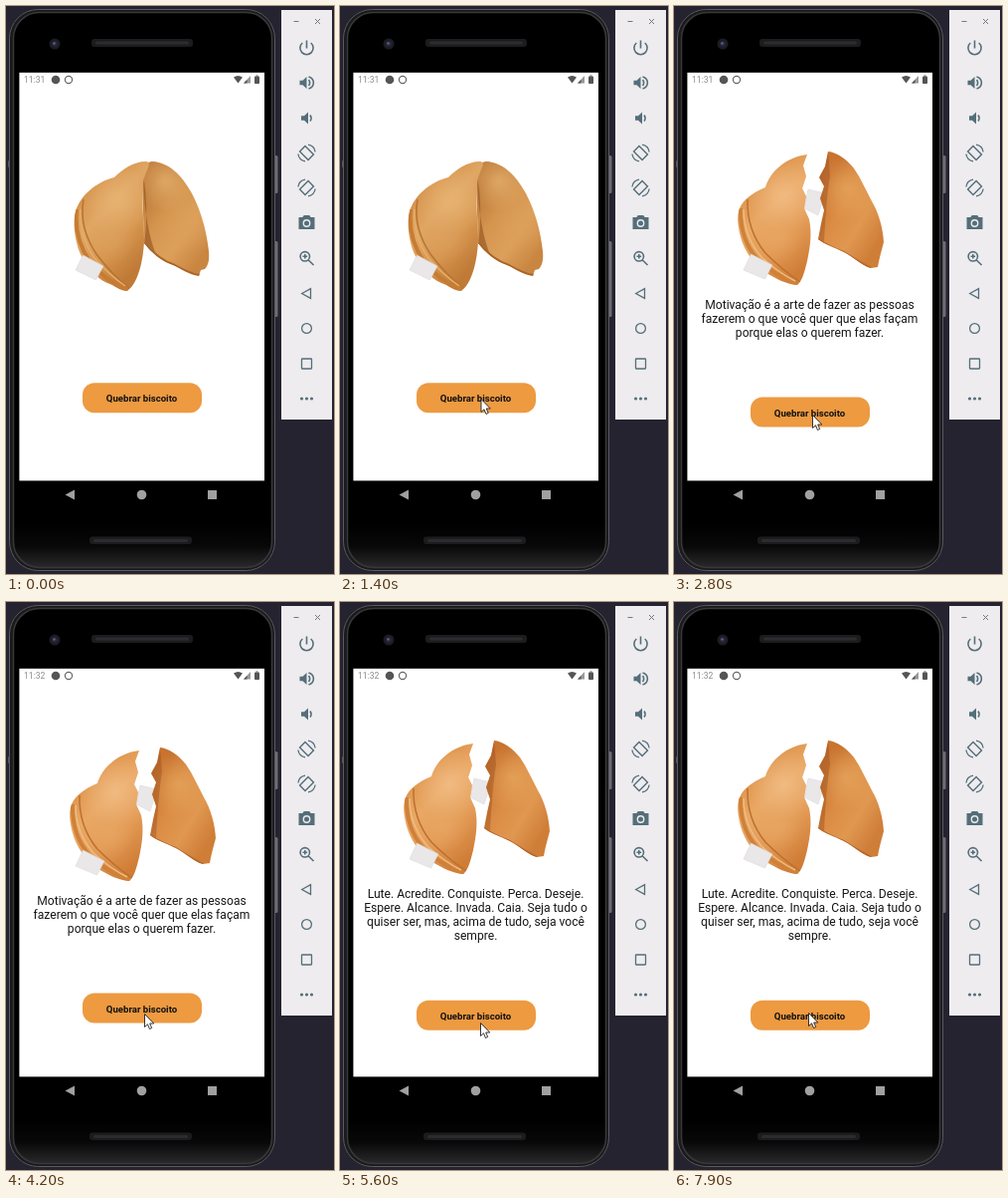
These frames come from a looping animation (330 by 570 pixels, 8000 ms). An HTML page with a canvas:

```html
<!DOCTYPE html>
<html lang="pt">
<head>
<meta charset="utf-8">
<style>
html, body { margin: 0; width: 330px; height: 570px; overflow: hidden; background: #262330; }
canvas { display: block; width: 330px; height: 570px; }
</style>
</head>
<body>
<canvas id="stage"></canvas>
<script>
const LOOP = 8000, CRACK = 1650, SECOND = 5000, MINUTE = 4000;
const canvas = document.getElementById('stage');
const ratio = window.devicePixelRatio || 1;
canvas.width = 330 * ratio;
canvas.height = 570 * ratio;
const c = canvas.getContext('2d');

const quotes = [
  ['Motivação é a arte de fazer as pessoas', 'fazerem o que você quer que elas façam', 'porque elas o querem fazer.'],
  ['Lute. Acredite. Conquiste. Perca. Deseje.', 'Espere. Alcance. Invada. Caia. Seja tudo o', 'quiser ser, mas, acima de tudo, seja você', 'sempre.']
];

// time, x, y of the pointer tip
const track = [
  [400, 122, 435], [800, 127, 418], [900, 134, 407], [1200, 141, 396], [1600, 142, 392],
  [1900, 142, 392], [2700, 139, 406], [2800, 139, 410], [3500, 139, 413], [5000, 139, 413],
  [5400, 141, 422], [6500, 141, 422], [7200, 136, 413], [7900, 135, 412]
];

function shape(path, fill, stroke, width = 1) {
  const p = new Path2D(path);
  if (fill) { c.fillStyle = fill; c.fill(p); }
  if (stroke) { c.strokeStyle = stroke; c.lineWidth = width; c.stroke(p); }
}
function box(x, y, w, h, r, fill, stroke, width = 1) {
  c.beginPath();
  c.roundRect(x, y, w, h, r);
  if (fill) { c.fillStyle = fill; c.fill(); }
  if (stroke) { c.strokeStyle = stroke; c.lineWidth = width; c.stroke(); }
}
function disc(x, y, r, fill, stroke, width = 1) {
  box(x - r, y - r, 2 * r, 2 * r, r, fill, stroke, width);
}
function text(s, x, y, font, fill, align = 'center') {
  c.font = font + ' Roboto, sans-serif';
  c.textAlign = align;
  c.fillStyle = fill;
  c.fillText(s, x, y);
}
function gradient(x0, y0, x1, y1, ...colors) {
  const g = c.createLinearGradient(x0, y0, x1, y1);
  colors.forEach((v, i) => g.addColorStop(i / (colors.length - 1), v));
  return g;
}
function glow(x, y, r, color) {
  const g = c.createRadialGradient(x, y, 0, x, y, r);
  g.addColorStop(0, color);
  g.addColorStop(1, color.slice(0, 7) + '00');
  c.fillStyle = g;
  c.fillRect(x - r, y - r, 2 * r, 2 * r);
}
function clipped(path, draw) {
  c.save();
  c.clip(new Path2D(path));
  draw();
  c.restore();
}

function phone() {
  c.fillStyle = '#262330';
  c.fillRect(0, 0, 330, 570);
  box(269, 150, 4.5, 38, 1.5, '#6c6c72');
  box(269, 236, 4.5, 76, 1.5, '#6c6c72');
  box(2, 155, 2, 7, 1, '#55555a');
  box(3, 3, 268, 564, 29, '#1a1a1c');
  box(3.5, 3.5, 267, 563, 29, null, '#5a5b62');
  box(7.5, 6.5, 260, 557, 26, gradient(0, 520, 0, 564, '#000', '#080809', '#2a2a2c'), '#38383b', 1.5);
  box(86, 33, 102, 8, 3, '#1c1c1e');
  box(90, 35.5, 94, 3, 1.5, '#2c2c2e');
  box(84, 532.5, 103, 7.5, 3, '#1c1c1e');
  box(88, 535, 95, 3, 1.5, '#2c2c2e');
  disc(49, 38, 5.5, '#1c1c22');
  disc(49, 38, 3, '#25273b');
  disc(48.5, 37.5, 1.3, '#5c6084');
  c.fillStyle = '#fff';
  c.fillRect(13.4, 66.8, 246.6, 409.6);
  const nav = '#a0a0a0';
  shape('M59.5 490.5L69 485.5V495.5Z', nav);
  disc(136.5, 490.5, 4.8, nav);
  c.fillStyle = nav;
  c.fillRect(203, 486, 9, 9);
}

function statusBar(t) {
  text(t < MINUTE ? '11:31' : '11:32', 18, 77, '8.6px', '#8c8c8c', 'left');
  disc(50, 74, 4.3, '#555');
  disc(63, 74, 3.6, null, '#666', 1.2);
  shape('M229 71.5Q233.5 68.5 238 71.5L233.5 77.5Z', '#555');
  shape('M246 70V77.5H239Z', '#999');
  shape('M242.5 74V77.5H239Z', '#555');
  box(250, 70.5, 5, 7.5, 0.8, '#555');
  c.fillRect(251.5, 69.5, 2, 1);
}

function icon(y, fill, line, turn = 0, width = 1.6) {
  c.save();
  c.translate(302.5, y);
  c.rotate(turn);
  if (fill) shape(fill, '#546e7a');
  if (line) shape(line, null, '#546e7a', width);
  c.restore();
}
function toolbar() {
  c.fillStyle = '#eeecee';
  c.fillRect(277, 4, 51, 411);
  shape('M289.5 15.5H294.5M311 13L316 18M316 13L311 18', null, '#777', 1);
  const speaker = 'M-7 -2.3H-4L0 -6V6L-4 2.3H-7Z';
  icon(42, null, 'M0 -7.5V0.5M-4.2 -5A6.6 6.6 0 1 0 4.2 -5');
  icon(77, speaker, 'M2 -3Q4.3 0 2 3M2 -6C8.5 -4 8.5 4 2 6');
  icon(112.5, 'M-5.5 -2.3H-2.5L1.5 -6V6L-2.5 2.3H-5.5Z', 'M3.5 -3Q5.6 0 3.5 3');
  const body = 'M-3.8 -6H3.8V6H-3.8Z';
  icon(147.5, null, body, -0.785, 1.4);
  icon(147.5, null, 'M1.5 -8.3Q7.8 -7.2 8.6 -1M-1.5 8.3Q-7.8 7.2 -8.6 1', 0, 1.3);
  icon(182.5, null, body, 0.785, 1.4);
  icon(182.5, null, 'M-1.5 -8.3Q-7.8 -7.2 -8.6 -1M1.5 8.3Q7.8 7.2 8.6 1', 0, 1.3);
  icon(217, 'M-8 -5H-4.2L-2.7 -7H2.7L4.2 -5H8V7H-8Z');
  disc(302.5, 218, 3.9, '#eeecee');
  disc(302.5, 218, 2.5, '#546e7a');
  icon(253, null, 'M3 -1.7A4.7 4.7 0 1 1 -6.4 -1.7A4.7 4.7 0 1 1 3 -1.7M1.6 1.7L7 7M-4 -1.7H0.6M-1.7 -4V0.6');
  icon(288.5, null, 'M-4.8 0L4 -4.8V4.8Z', 0, 1.3);
  disc(302.5, 323.5, 4.9, null, '#546e7a', 1.3);
  box(297.5, 354, 10, 10, 0.5, null, '#546e7a', 1.3);
  for (const x of [-5, 0, 5]) disc(302.5 + x, 394, 1.6, '#546e7a');
}

function paper(path) {
  shape(path, '#e9e7e8', '#dcd8d8', 0.6);
}

function wholeCookie() {
  const back = 'M137 176C139 162 140 157 147 156C164 157 177 170 187 188C197 207 202 228 204 246C205 256 203 261 200 264L196 265L194 271C184 270 175 263 168 260C156 256 146 247 139 238Z';
  clipped(back, () => {
    c.fillStyle = gradient(138, 190, 206, 240, '#bd7b3a', '#d4954f', '#dda05b', '#c98641');
    c.fillRect(135, 150, 75, 125);
    glow(160, 176, 30, '#e2ab68e0');
    glow(186, 220, 28, '#dda05aa0');
    shape('M138 168Q144 205 139 240L152 252Q139 222 138 168', '#8a4c1b90');
    shape('M139 238Q154 255 170 260Q186 269 195 270', null, '#a8642a', 2);
  });
  const front = 'M109 172C117 164 128 156 141 156C148 157 140 165 138 178C136 200 139 214 139 236C138 256 133 278 122 286C114 286 109 280 102 278C91 274 80 260 74 247C69 234 67 218 70 206C75 190 90 177 109 172Z';
  clipped(front, () => {
    c.fillStyle = gradient(72, 190, 140, 255, '#d49049', '#e0a663', '#d6954f', '#bf7a36');
    c.fillRect(65, 150, 85, 140);
    glow(112, 195, 36, '#e8b574d0');
    glow(104, 232, 28, '#dfa56290');
    shape('M78 194Q73 222 91 249Q107 270 124 283', null, '#b87634', 1.6);
    shape('M71 204Q68 232 84 256Q98 275 122 284', null, '#c67c32', 4);
    shape('M75 204Q73 230 89 253Q104 270 120 281', null, '#e5ae6b', 1.5);
  });
  paper('M77.5 250L98 261L90.5 275L70 265Z');
}

function brokenCookie(dy, alpha) {
  c.save();
  c.globalAlpha = alpha;
  c.translate(0, dy);
  paper('M135 184L152 188L145 210L131 203Z');
  const left = 'M134 149L130 160L133 171L129 183L133 191L131 203L136 214C139 228 137 242 134 256C131 268 129 276 124 280C112 279 104 274 93 268C80 259 71 246 67 232C64 220 63 211 66 203C70 194 78 188 92 182C97 166 112 152 134 149Z';
  clipped(left, () => {
    c.fillStyle = gradient(72, 180, 140, 256, '#dc9149', '#e9a865', '#e29a55', '#cf7c35');
    c.fillRect(60, 145, 82, 140);
    glow(110, 190, 36, '#f3c08ac0');
    glow(104, 232, 26, '#eaab6880');
    shape('M74 194Q73 225 92 248Q108 264 127 277', null, '#bd7030', 1.5);
    shape('M67 203Q66 233 83 253Q99 270 125 279', null, '#cf813a', 4);
    shape('M70 204Q70 231 88 252Q104 267 122 276', null, '#efbc7e', 1.5);
  });
  const right = 'M155 146C164 147 173 153 181 163C188 173 193 185 199 196C206 208 210 222 211 237C209 245 207 251 205 262L198 263C188 260 181 252 171 247C161 242 151 239 145 234L148 218L151 205L147 193L151 181L146 172L152 161Z';
  clipped(right, () => {
    c.fillStyle = gradient(146, 190, 210, 230, '#c8732f', '#db8c44', '#e09750', '#cf7e38');
    c.fillRect(143, 142, 75, 142);
    glow(173, 183, 33, '#e8a961b0');
    shape('M155 146L146 172L151 181L147 193L151 205L145 234L151 237Q153 195 157 170Z', '#91461960');
    shape('M145 234Q155 241 171 247Q187 257 198 263', null, '#b5672b', 2);
  });
  paper('M77.5 249L99 260L91.5 274L70 265Z');
  c.restore();
}

function button(y, alpha) {
  c.save();
  c.globalAlpha = alpha;
  box(77, y, 120, 30, 12, '#ed9a41');
  text('Quebrar biscoito', 136.5, y + 19, 'bold 9.6px', '#111');
  c.restore();
}

// brief dimming around a press
function pressAlpha(t, at) {
  const d = t - at;
  if (d < -150 || d > 250) return 1;
  return d < 0 ? 1 - 0.4 * (d + 150) / 150 : 0.6 + 0.4 * Math.min(1, d / 200);
}

function pointer(t) {
  if (t < track[0][0]) return;
  let i = 0;
  while (i < track.length - 2 && t >= track[i + 1][0]) i++;
  const [t0, x0, y0] = track[i], [t1, x1, y1] = track[i + 1];
  const k = Math.min(1, (t - t0) / (t1 - t0));
  c.save();
  c.translate(x0 + (x1 - x0) * k + 0.5, y0 + (y1 - y0) * k + 0.5);
  shape('M0 0V13L3 10.3L5 15L7.2 14L5.2 9.5H9.3Z', '#fff', '#222', 0.9);
  c.restore();
}

function draw(t) {
  c.setTransform(ratio, 0, 0, ratio, 0, 0);
  phone();
  statusBar(t);
  toolbar();
  const state = t < CRACK ? 0 : t < SECOND ? 1 : 2;
  if (state) {
    const dy = state === 1 ? 0 : -7;
    brokenCookie(dy, Math.min(1, (t - CRACK) / 300));
    quotes[state - 1].forEach((line, i) => text(line, 136.5, 304 + dy + 14 * i, '12.1px', '#151515'));
  } else wholeCookie();
  button([378.2, 392.6, 399.8][state], pressAlpha(t, CRACK) * pressAlpha(t, SECOND));
  pointer(t);
}

function tick(now) {
  draw(now % LOOP);
  requestAnimationFrame(tick);
}
draw(0);
requestAnimationFrame(tick);
</script>
</body>
</html>
```
